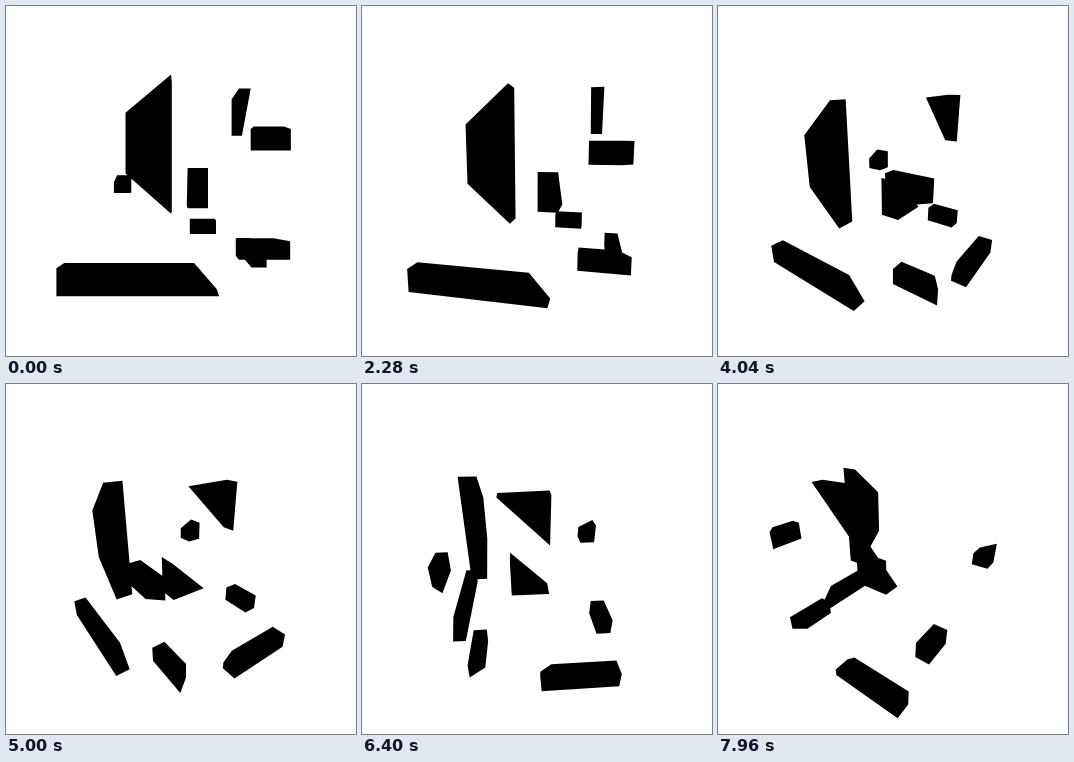
Animation, 350 px wide and 350 px high, one loop 8000 ms. Source, as an HTML page:

```html
<!DOCTYPE html>
<html lang="en">
<head>
<meta charset="utf-8">
<title>Orbiting blocks</title>
<style>
  html, body { margin: 0; width: 100%; height: 100%; overflow: hidden; background: #fff; }
  svg { display: block; width: 100%; height: 100%; }
</style>
</head>
<body>
<svg viewBox="0 0 350 350"><path id="blocks"/></svg>
<script>
const LOOP = 8, STEP = 0.04;
const CENTER = { x: 175, y: 178 }, FOCAL = 280;
const { PI, sin, cos, floor } = Math;
const radians = degrees => degrees * PI / 180;

// Extrudes a flat profile along one axis; x points right, y down, z to the viewer.
const prism = (axis, from, to, profile) => [from, to].flatMap(d => profile.map(([a, b]) =>
  axis === "x" ? [d, a, b] : axis === "y" ? [a, d, b] : [a, b, d]));

const blocks = [
  prism("z", 52, 68, [[-42, -54], [-7.5, -83], [-7.5, 22.5], [-42, -8]]),
  prism("z", 76, 89, [[-85, 57.5], [9.5, 57.5], [26, 76.5], [-85, 76.5]]),
  prism("y", -41, -25, [[52, 71], [82, 71], [73.5, 80], [52, 80]]),
  prism("y", 44.5, 59, [[45, 50], [76, 50], [85, 62], [45, 62]]),
  prism("y", 43.5, 60, [[11, -70], [42, -70], [42, -56], [11, -56]]),
  prism("x", 51.5, 62, [[-85, 31], [-86, -5], [-49, -5]]),
  prism("x", 6, 24.5, [[-14.5, 26], [22, 26], [22, -10]]),
  prism("x", -81, -63, [[-2, -58], [11, -58], [11, -75], [-11, -75]]),
  prism("x", 70, 85, [[67, -8], [67, -68], [83, -68], [83, 2], [76, 2]])
];

// The camera swings round the group while it rises and then sinks again.
function camera(t) {
  const yaw = radians(185 * (1 - cos(PI * t / 20)));
  const pitch = radians(15 * (1 - cos(PI * t / 6.75)));

  return ([x, y, z]) => {
    const side = x * cos(yaw) - z * sin(yaw);
    const depth = x * sin(yaw) + z * cos(yaw);
    const down = y * cos(pitch) + depth * sin(pitch);
    const near = depth * cos(pitch) - y * sin(pitch);
    const scale = FOCAL / (FOCAL - near);
    return [CENTER.x + side * scale, CENTER.y + down * scale];
  };
}

function halfHull(points) {
  const hull = [];
  for (const p of points) {
    while (hull.length > 1) {
      const [a, b] = hull.slice(-2);
      if ((b[0] - a[0]) * (p[1] - a[1]) > (b[1] - a[1]) * (p[0] - a[0])) break;
      hull.pop();
    }
    hull.push(p);
  }
  return hull.slice(0, -1);
}

function outline(points) {
  points.sort((a, b) => a[0] - b[0] || a[1] - b[1]);
  const hull = [...halfHull(points), ...halfHull(points.slice().reverse())];
  return "M" + hull.map(p => p.map(v => v.toFixed(2)).join()).join("L") + "Z";
}

const path = document.getElementById("blocks");

function draw() {
  const t = floor(performance.now() / 1000 % LOOP / STEP + 1e-6) * STEP;
  const project = camera(t);
  path.setAttribute("d", blocks.map(block => outline(block.map(project))).join(""));
  requestAnimationFrame(draw);
}
draw();
</script>
</body>
</html>
```
